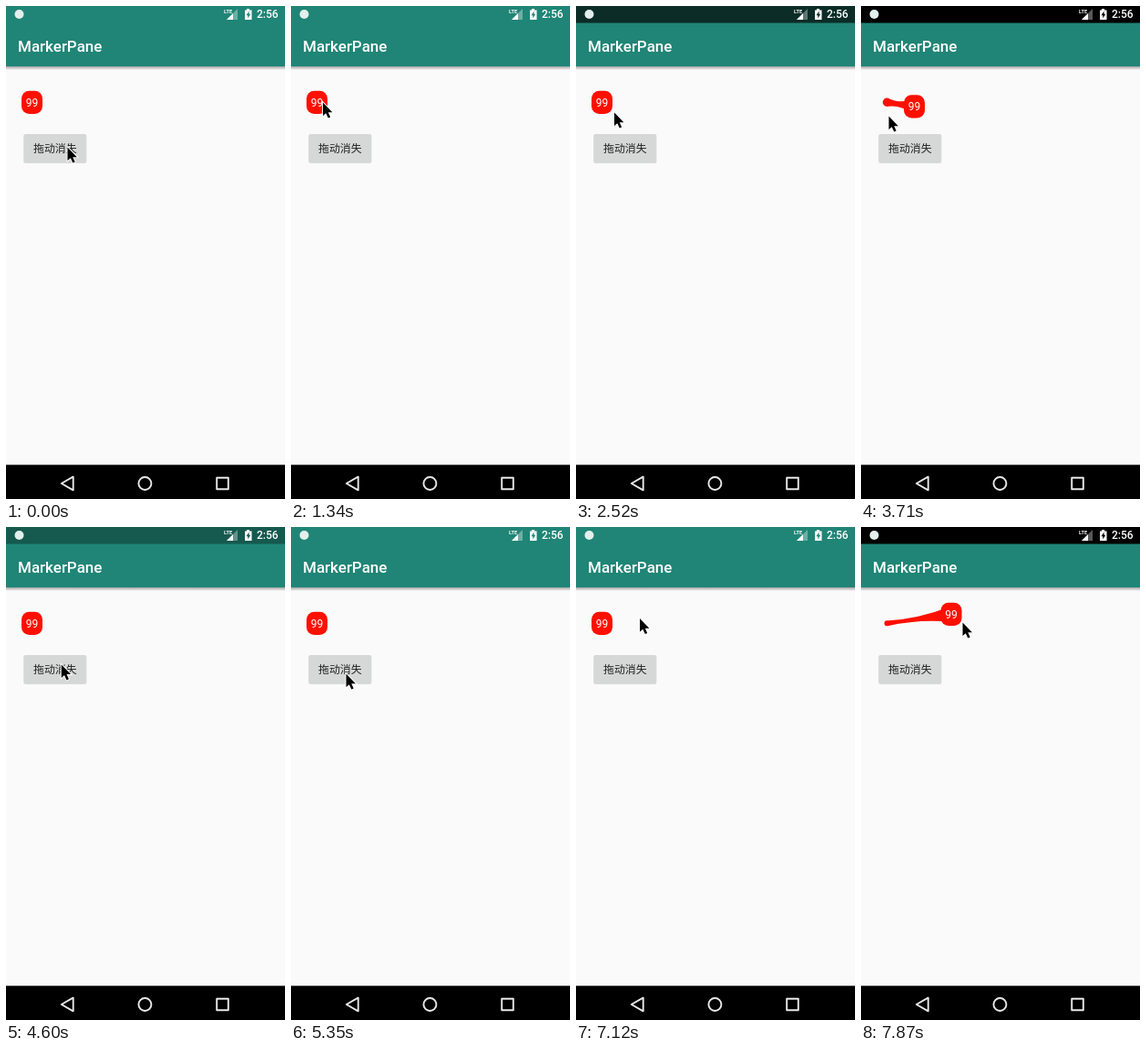
Write an HTML page that moves like this. It is 306 by 539 pixels and loops after 8 s.

```html
<!DOCTYPE html>
<html lang="zh">
<head>
<meta charset="utf-8">
<title>Drag badge</title>
<style>
  html, body { margin: 0; width: 100%; height: 100%; overflow: hidden; background: #fafafa; }
  svg { display: block; width: 100%; height: 100%; }
  text { font-family: Roboto, "Noto Sans CJK SC", "Noto Sans CJK", sans-serif; fill: #fff; }
  .cjk { font-family: "Noto Sans CJK SC", "Noto Sans CJK", sans-serif; fill: #212121; }
  .goo { fill: #ff0f00; }
  .nav { fill: none; stroke: #e8e8e8; stroke-width: 1.9; stroke-linejoin: round; }
  #cursor { stroke: #fff; stroke-width: 1.8; paint-order: stroke; }
</style>
</head>
<body>
<svg viewBox="0 0 306 539">
  <defs>
    <linearGradient id="shade" x2="0" y2="1">
      <stop stop-color="#000" stop-opacity=".35"/>
      <stop offset="1" stop-color="#000" stop-opacity="0"/>
    </linearGradient>
  </defs>
  <rect width="306" height="539" fill="#fafafa"/>
  <rect y="66" width="306" height="4" fill="url(#shade)"/>
  <rect width="306" height="66" fill="#208576"/>
  <rect id="bar" width="306" height="18.5"/>

  <circle cx="14.5" cy="9" r="5" fill="#e3efed"/>
  <text x="239" y="7.5" font-size="5.6" font-weight="700">LTE</text>
  <path d="M242 15L254 3V15Z" fill="#fff" opacity=".35"/>
  <path d="M242 15L249 8V15Z" fill="#fff"/>
  <path d="M262 4.5H264V3H267V4.5H269.5V15H262Z" fill="#fff"/>
  <path id="bolt" d="M266.5 5.5L263.5 10.2H265.3V13.5L268.2 8.8H266.5Z"/>
  <text x="275" y="13.3" font-size="12" font-weight="500">2:56</text>
  <text x="13" y="49.6" font-size="17" font-weight="500">MarkerPane</text>

  <path id="buttonGoo" class="goo"/>
  <g id="button">
    <rect id="buttonShadow" x="19.2" y="140" width="69.2" height="32" rx="2.5" fill="#000" opacity=".13"/>
    <rect x="19.8" y="140" width="68" height="31" rx="2" fill="#d6d7d7"/>
    <text class="cjk" x="30" y="159.7" font-size="11.9">拖动消失</text>
  </g>

  <path id="badgeGoo" class="goo"/>
  <g id="badge">
    <rect class="goo" x="17" y="92.8" width="23" height="25.2" rx="8.5"/>
    <text x="28.5" y="109.8" font-size="12" text-anchor="middle">99</text>
  </g>

  <rect y="501.6" width="306" height="38"/>
  <path class="nav" d="M60.8 522L73.7 514.7V529.3Z"/>
  <circle class="nav" cx="152.4" cy="522" r="7"/>
  <rect class="nav" x="231.2" y="515.8" width="12.6" height="12.4"/>

  <path id="cursor" d="M0 0V14.6L3.3 11.7L5.8 17L8.2 15.9L5.8 10.7H10.4Z"/>
</svg>
<script>
const LOOP = 8000, HOLD = 750, STEP = 148.33, STEP_START = 740;
const BAR = [32, 133, 118];

// Times are in steps; swing bends the drag up or down around its furthest point.
const drags = [
  { id: "badge", start: 5, end: 10.5, dx: 46, dy: 24, swing: 0 },
  { id: "badge", start: 16, end: 24, dx: 30, dy: 4.5, swing: 0 },
  { id: "button", start: 32, end: 36.5, dx: 12, dy: 30, swing: 0 },
  { id: "badge", start: 44, end: 52, dx: 70.5, dy: -10, swing: -50 }
];
const centers = { badge: [28.5, 105.3], button: [54, 155.5] };

// Pointer stops: [step, x, y]
const stops = [
  [-1, 67.5, 154.5], [4, 35, 105.5], [8, 88, 130], [12, 42, 116.5], [17, 72, 112],
  [20, 30.5, 120.5], [24, 62, 112], [29, 60, 172], [31, 60.5, 160.5], [37, 52.5, 298],
  [42, 42, 114], [46, 106, 82], [48, 111.5, 104.5]
];

const el = id => document.getElementById(id);
const clamp = v => Math.min(1, Math.max(0, v));
const move = (id, x, y) => el(id).setAttribute("transform", `translate(${x} ${y})`);

function pointer(step) {
  const i = Math.max(1, stops.findIndex(stop => stop[0] >= step));
  const [t0, x0, y0] = stops[i - 1], [t1, x1, y1] = stops[i];
  const p = 1 - (1 - (step - t0) / (t1 - t0)) ** 2;
  return [x0 + (x1 - x0) * p, y0 + (y1 - y0) * p];
}

// Out and back along a sine, then one short step of overshoot.
function dragOffset({ start, end, dx, dy, swing }, step) {
  if (step <= start || step >= end + 1) return [0, 0];
  const angle = Math.PI * (step - start) / (end - start);
  const k = Math.sin(angle) * (step > end ? .25 : 1);
  return [dx * k, (dy + swing * Math.cos(angle)) * k];
}

// The status bar darkens while something is being dragged.
const darkness = ({ start, end }, step) =>
  Math.min(clamp((step - start) / 1.5), clamp(1 - (step - end - 1) / 1.5));

// Elastic link: an anchor circle that shrinks with distance, joined by two curves.
function gooPath([x, y], dx, dy) {
  const dist = Math.hypot(dx, dy);
  if (dist < 3) return "";
  const r = Math.max(2, 6 - dist * .043), R = 8.5;
  const nx = -dy / dist, ny = dx / dist;
  const mid = `${x + dx / 2} ${y + dy / 2}`;
  const at = (cx, cy, k) => `${cx + nx * k} ${cy + ny * k}`;
  const ex = x + dx, ey = y + dy;
  return `M${at(x, y, r)}Q${mid} ${at(ex, ey, R)}L${at(ex, ey, -R)}Q${mid} ${at(x, y, -r)}Z`
    + `M${x - r} ${y}a${r} ${r} 0 1 0 ${2 * r} 0a${r} ${r} 0 1 0 ${-2 * r} 0Z`;
}

function drawDragged(id, step) {
  const active = drags.find(d => d.id === id && step < d.end + 1);
  const [dx, dy] = active ? dragOffset(active, step) : [0, 0];
  move(id, dx, dy);
  el(id + "Goo").setAttribute("d", gooPath(centers[id], dx, dy));
  return dx !== 0 || dy !== 0;
}

function draw() {
  const t = performance.now() % LOOP;
  const step = t < HOLD ? -1 : Math.min(48, Math.floor((t - STEP_START) / STEP));

  move("cursor", ...pointer(step));
  drawDragged("badge", step);
  const lifted = drawDragged("button", step);
  el("buttonShadow").style.display = lifted ? "none" : "";

  const dark = Math.max(...drags.map(d => darkness(d, step)));
  const color = `rgb(${BAR.map(c => Math.round(c * (1 - dark)))})`;
  el("bar").setAttribute("fill", color);
  el("bolt").setAttribute("fill", color);
  requestAnimationFrame(draw);
}
draw();
</script>
</body>
</html>
```
